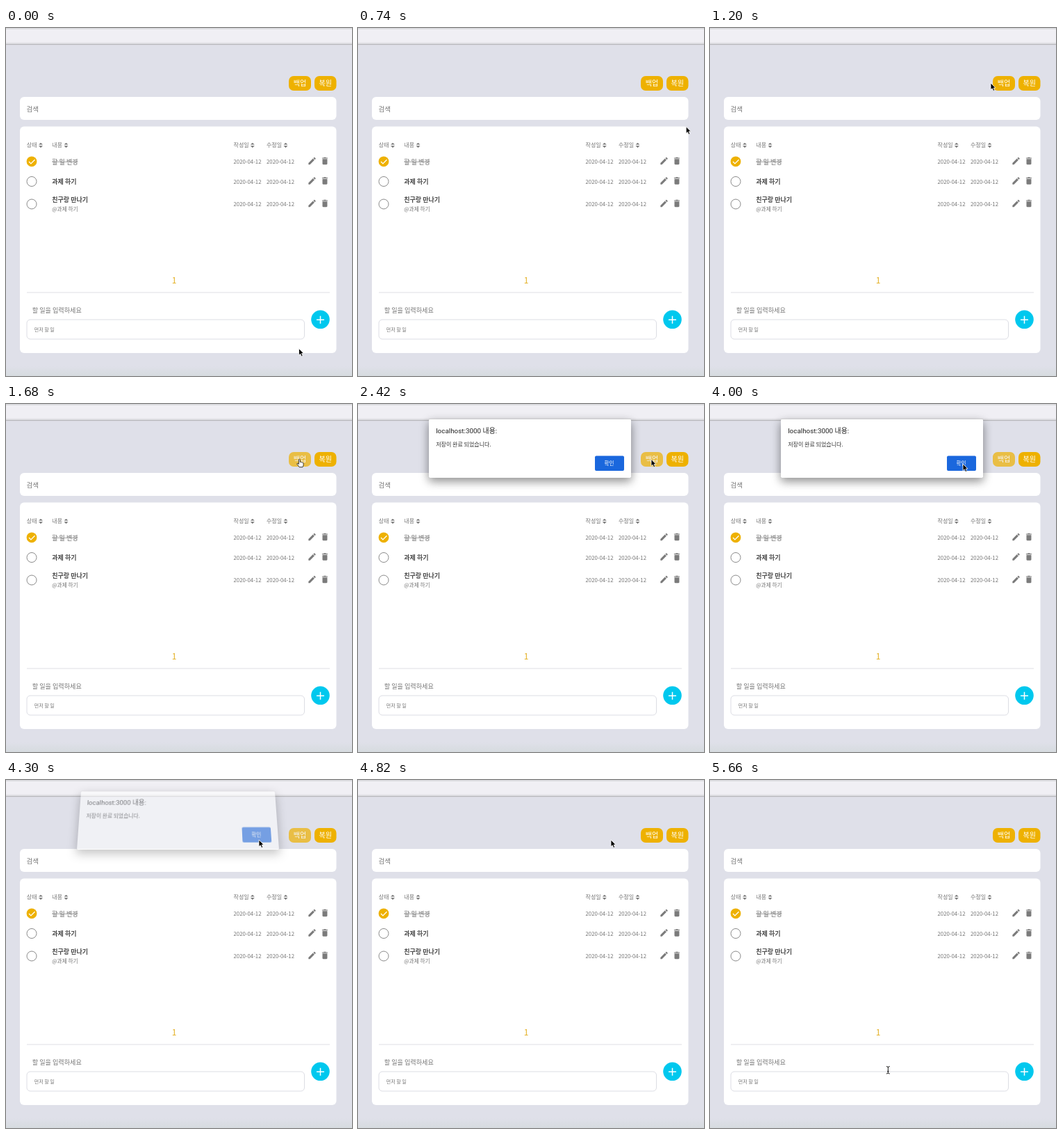
Recreate the animation shown at these times as an HTML page. Size 498 by 500 pixels, loop 5.74 s.

```html
<!DOCTYPE html>
<html>
<head>
<meta charset="utf-8">
<style>
  html, body { margin: 0; width: 100%; height: 100%; overflow: hidden; background: #dfe0e9; }
  svg { position: absolute; left: 0; top: 0; }
  text { font-family: "Noto Sans CJK KR", "Noto Sans CJK", sans-serif; fill: #757575; white-space: pre; }
  .title { font-size: 9px; font-weight: 700; fill: #484848; }
  .done { fill: #999; text-decoration: line-through; }
  .head, .date { font-size: 8px; }
  .date { font-size: 7.8px; }
  .button text { font-size: 10px; fill: #fff; text-anchor: middle; }
  #dialog { transform-origin: 247.5px 106px; }
  #panel { filter: drop-shadow(0 5px 7px rgba(0,0,0,.32)) drop-shadow(0 0 .6px rgba(0,0,0,.5)); }
</style>
</head>
<body>
<svg width="498" height="500" viewBox="0 0 498 500">
  <defs>
    <linearGradient id="footer" x2="0" y2="1">
      <stop stop-color="#dfe0e9"/><stop offset="1" stop-color="#d6dbdf"/>
    </linearGradient>
    <path id="sort" d="M-3 -.7L0 -3.4L3 -.7ZM-3 1L0 3.8L3 1Z" fill="#707070"/>
    <g id="tools" fill="#7b7b7b">
      <path transform="translate(433.6 -7.2) scale(.58)" d="M3 17.25V21h3.75L17.81 9.94l-3.75-3.75L3 17.25zM20.71 7.04c.39-.39.39-1.02 0-1.41l-2.34-2.34c-.39-.39-1.02-.39-1.41 0l-1.83 1.83 3.75 3.75 1.83-1.83z"/>
      <path transform="translate(452 -7.1) scale(.58)" d="M6 19c0 1.1.9 2 2 2h8c1.1 0 2-.9 2-2V7H6v12zM19 4h-3.5l-1-1h-5l-1 1H5v2h14V4z"/>
    </g>
  </defs>

  <rect width="498" height="500" fill="#dfe0e9"/>
  <rect y="486" width="498" height="14" fill="url(#footer)"/>
  <rect width="498" height="23" fill="#f0eff4"/>
  <rect width="498" height="2" fill="#dcdce0"/>
  <rect y="20.5" width="498" height="2.5" fill="#e5e4e9"/>
  <rect y="22.8" width="498" height="1.4" fill="#b7b7bb"/>

  <g class="button" id="backup">
    <rect x="407" y="69" width="32" height="21" rx="7" fill="#eeb100"/><text x="423" y="83.2">백업</text>
  </g>
  <g class="button">
    <rect x="444" y="69" width="31.5" height="21" rx="7" fill="#eeb100"/><text x="459.7" y="83.2">복원</text>
  </g>

  <g fill="#fff">
    <rect x="20" y="99" width="455.5" height="33" rx="6"/>
    <rect x="20" y="141.5" width="455.5" height="325.5" rx="6"/>
  </g>
  <text x="29.5" y="119.8" font-size="9.5">검색</text>
  <g id="table"></g>

  <text x="242.2" y="366.8" font-size="12" text-anchor="middle" style="fill:#e3af22">1</text>
  <path d="M30 380H466" stroke="#dedee4"/>
  <text x="37.8" y="408.5" font-size="9.1">할 일을 입력하세요</text>
  <rect x="30" y="419" width="399.5" height="28" rx="5" fill="#fff" stroke="#dcdde4"/>
  <text x="40.8" y="436.2" font-size="7">먼저 할 일</text>
  <circle cx="452.5" cy="418.8" r="13.3" fill="#00c8ee"/>
  <path d="M447 419.2h11M452.5 413.7v11" stroke="#fff" stroke-width="1.5"/>
</svg>

<svg id="dialog" width="498" height="500" viewBox="0 0 498 500">
  <rect id="panel" x="102" y="21.5" width="291" height="84.5" rx="1.5" fill="#fff"/>
  <text x="112.2" y="42.2" font-size="9.9" style="font-family:Roboto,'Noto Sans CJK KR',sans-serif;fill:#222">localhost:3000 내용:</text>
  <text x="112.2" y="61" font-size="8" style="fill:#333">저장이 완료 되었습니다.</text>
  <rect x="341" y="74.5" width="42" height="21.5" rx="2" fill="#1a67dd"/>
  <text x="361.5" y="88" font-size="7.6" font-weight="500" text-anchor="middle" style="fill:#fff">확인</text>
</svg>

<svg width="498" height="500" viewBox="0 0 498 500">
  <g id="cursor" stroke-linejoin="round">
    <path id="arrow" d="M0 0V9.8L2.2 7.8L3.8 11.4L5.6 10.6L4.1 7.1H7Z" fill="#000" stroke="#fff" stroke-width=".8"/>
    <path id="hand" d="M-.6 .4Q.4 -.8 1.3 .4V4Q2.6 3.2 3.2 4.4Q4.4 3.8 4.9 5Q6.2 4.8 6.2 6.2Q6.3 9 5 11.2H.1Q-1.2 9 -3 7Q-3.4 5.4 -1.8 5.9L-.6 7Z" fill="#fff" stroke="#222" stroke-width=".9"/>
    <path id="beam" d="M-2.4 -5.2Q0 -5.2 0 -3.8Q0 -5.2 2.4 -5.2M0 -4V4M-2.4 5.2Q0 5.2 0 3.8Q0 5.2 2.4 5.2M-1.2 1.8H1.2" fill="none" stroke="#111" stroke-width="1"/>
  </g>
</svg>

<script>
const LOOP = 5740;
const $ = id => document.getElementById(id);
const text = (kind, x, y, content) => `<text class="${kind}" x="${x}" y="${y}">${content}</text>`;

const headings = [[29.8, 50, '상태'], [66.3, 86.5, '내용'], [327.6, 354.8, '작성일'], [375, 402.5, '수정일']];
const rows = [
  { y: 192, title: '할 일 변경', done: true },
  { y: 220.5, title: '과제 하기' },
  { y: 253, title: '친구랑 만나기', note: '@과제 하기' }
];

function rowMarkup({ y, title, done, note }) {
  const mark = done
    ? `<circle cx="37" cy="${y - .2}" r="7.4" fill="#eeb100"/><path d="M33 ${y}l2.9 2.9l5.6 -5.7" fill="none" stroke="#fff" stroke-width="1.3"/>`
    : `<circle cx="37" cy="${y}" r="7" fill="#fff" stroke="#7d7d7d" stroke-width=".9"/>`;
  return mark
    + text(done ? 'title done' : 'title', 66.3, note ? y - 3 : y + 3.6, title)
    + (note ? `<text x="66.3" y="${y + 10.4}" font-size="7.7">${note}</text>` : '')
    + [327.5, 375].map(x => text('date', x, y + 3, '2020-04-12')).join('')
    + `<use href="#tools" y="${y - .8}"/>`;
}

$('table').innerHTML = headings.map(([x, iconX, label]) =>
  text('head', x, 170.5, label) + `<use href="#sort" x="${iconX}" y="168.3"/>`).join('')
  + rows.map(rowMarkup).join('');

// Pointer path: time, x, y
const path = [
  [0, 421.5, 460.5], [440, 421.5, 460.5], [560, 458, 360], [660, 484, 215], [740, 472.5, 142],
  [860, 438, 100], [1000, 407, 81], [1200, 404, 79], [1360, 404, 79], [1500, 422, 79.5],
  [3020, 422, 79.5], [3200, 392, 109], [3340, 350, 102], [3500, 381.5, 75.5], [3600, 386, 78],
  [3860, 364, 86], [5380, 364, 86], [5660, 256.3, 416.8], [LOOP, 256.3, 416.8]
];

const progress = (t, start, end) => Math.min(1, Math.max(0, (t - start) / (end - start)));
const smooth = p => p * p * (3 - 2 * p);

function pointerAt(t) {
  const i = path.findIndex(point => point[0] > t);
  const [t0, x0, y0] = path[i - 1], [t1, x1, y1] = path[i];
  let p = progress(t, t0, t1);
  if (t0 === 5380) p = smooth(p);
  return [x0 + (x1 - x0) * p, y0 + (y1 - y0) * p];
}

function draw(t) {
  const [x, y] = pointerAt(t);
  const shape = t > 5380 && y > 400 ? 'beam' : t >= 1360 && t < 2100 && x > 407 ? 'hand' : 'arrow';
  $('cursor').setAttribute('transform', `translate(${x} ${y})`);
  for (const id of ['arrow', 'hand', 'beam']) $(id).style.display = id === shape ? '' : 'none';

  const hover = smooth(progress(t, 1380, 1680)) - smooth(progress(t, 4360, 4560));
  $('backup').style.opacity = 1 - .3 * hover;

  const closing = progress(t, 4220, 4380);
  const tilt = Math.min(1, closing * 2);
  $('dialog').style.opacity = progress(t, 2390, 2420) * (1 - closing * .9) * (closing < 1);
  $('dialog').style.transform = tilt
    ? `translateY(${-6 * tilt}px) perspective(500px) rotateX(${14 * tilt}deg) scaleY(${1 + .07 * tilt})`
    : 'none';
}

const start = performance.now();
function tick() {
  draw((performance.now() - start) % LOOP);
  requestAnimationFrame(tick);
}
tick();
</script>
</body>
</html>
```
